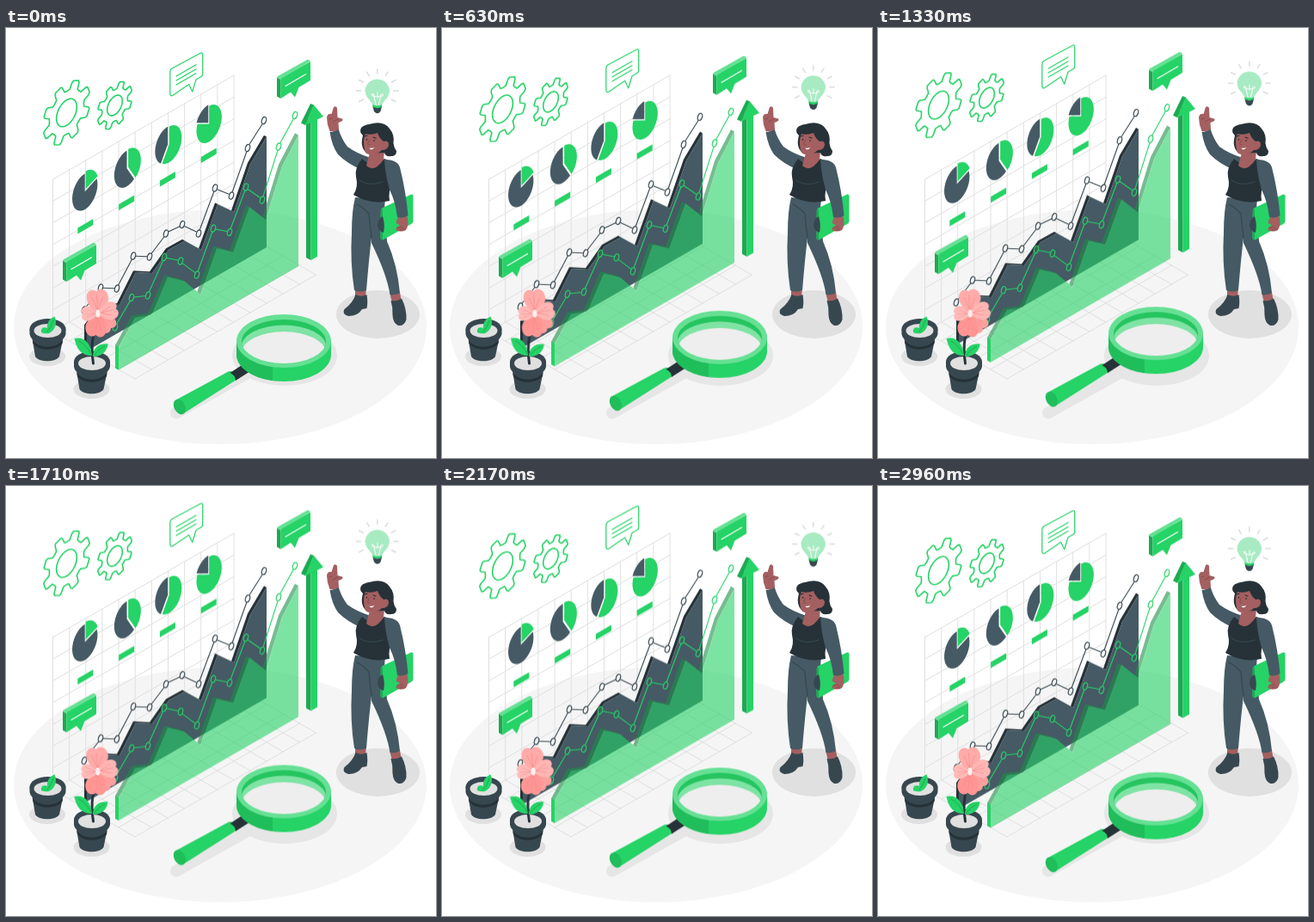
These frames come from a looping animation (500x500 px, 3000 ms). An HTML page:

```html
<!DOCTYPE html>
<html lang="en">
<head>
<meta charset="utf-8">
<title>Growth chart</title>
<style>
  html, body { margin: 0; width: 100%; height: 100%; overflow: hidden; background: #fff; }
  svg { display: block; width: 100vw; height: 100vh; }
  .float { animation: float 3s linear infinite; }
  .wind { animation: wind 3s linear infinite; transform-origin: 100px 390px; }
  @keyframes float { 50% { transform: translateY(-10px); } }
  @keyframes wind { 25% { transform: rotate(1deg); } 75% { transform: rotate(-1deg); } }
  .g { fill: #25d366; }
  .gm { fill: #20bd5b; }
  .gd { fill: #1ea952; }
  .gl { fill: #66e094; }
  .d1 { fill: #455a64; }
  .d2 { fill: #37474f; }
  .d3 { fill: #263238; }
  .skin { fill: #a45f60; }
  .shadow { fill: #e0e0e0; }
  .line { fill: none; stroke-linecap: round; stroke-linejoin: round; }
</style>
</head>
<body>
<svg viewBox="0 0 500 500">
  <defs>
    <g id="bubble">
      <path class="gd" d="M315 57.500l4.500 2.500V82l-4.500-2.500z"/>
      <path class="gl" d="M315 57.500q0-1 1-1.500l34-19q1-.5 2 0l2 1.500-34.500 21.500z"/>
      <path class="g" d="M319.500 60q0-1 1-1.500l32.500-19q1-.5 1 .8V60q0 1-1 1.500L340.500 69 336 80.500 331 74.500 319.500 82z"/>
      <path class="line" stroke="#fff" stroke-width="1.200" d="M325 67.500L348.500 53.700"/>
    </g>
    <g id="pot">
      <ellipse class="shadow" cx="48" cy="382" rx="21" ry="11"/>
      <path class="d2" d="M30 358L34 382C38 389 58 389 62 382L67 358z"/>
      <path class="d3" d="M30.800 363C38 373 58 373 66 363L65.500 367C58 376 38 376 31.500 367z"/>
      <path class="d2" d="M27.500 350V356C30 371 66 371 69.500 356V350z"/>
      <ellipse class="d2" cx="48.500" cy="350" rx="21" ry="12"/>
      <ellipse cx="48.500" cy="352" rx="16" ry="8" fill="#e0e0e0"/>
    </g>
    <path id="petal" d="M0 0C-6-4-13-13-10-21C-7-27-2-25 0-23C4-28 12-24 12-15C11-8 5-3 0 0z"/>
  </defs>

  <ellipse cx="249" cy="347.500" rx="240" ry="136.500" fill="#f5f5f5"/>
  <path id="grid" class="line" stroke="#e0e0e0"/>
  <ellipse class="shadow" cx="432.500" cy="333" rx="48.500" ry="28"/>
  <ellipse cx="324" cy="381" rx="61" ry="35" fill="#e6e6e6"/>
  <path class="line" stroke="#e6e6e6" stroke-width="14" d="M198 447.500L290 396"/>

  <g class="float">
    <path id="gears" class="line" stroke="#25d366" stroke-width="1.600"/>
    <path class="line" stroke="#25d366" stroke-width="1.200" d="M193 47L226 29.300Q228.700 28 228.700 31V54Q228.700 55.500 227 56.500L221 60 216.700 74 212.700 65.500 194 78.300Q190.800 80 190.800 76V51Q190.800 48.300 193 47zM198 56L221 42.700M198 61L221 47.700M198 66L221 52.700"/>
    <g id="pies"></g>
    <use href="#bubble"/>
    <use href="#bubble" x="-249" y="213"/>
    <g id="chart"></g>

    <path class="gd" d="M349 107V267L354.500 270V104z"/>
    <path class="g" d="M354.500 104V270L362 265.700V102z"/>
    <path class="gd" d="M343 110.500L354 88 358 89.500 348 113z"/>
    <path class="g" d="M348 113L357.500 89 369 103z"/>

    <path class="g" d="M198.500 432L258.500 399.500Q266 397 268 409L206 448.500z"/>
    <path class="d3" d="M260.500 401L281 387.500Q288 390 286.500 397.500L267 410Q267 404 260.500 401z"/>
    <ellipse class="gm" cx="201.800" cy="440.500" rx="6.300" ry="9.300" transform="rotate(-28 201.800 440.500)"/>
    <path class="g" d="M268 364V380A55 31 0 0 0 378 380V364z"/>
    <path class="gm" d="M268 364V380A55 31 0 0 0 310 410V394z"/>
    <ellipse class="gl" cx="323" cy="364" rx="55" ry="31"/>
    <clipPath id="lens"><ellipse cx="323" cy="364.500" rx="49" ry="25.500"/></clipPath>
    <g clip-path="url(#lens)">
      <rect x="270" y="335" width="106" height="60" fill="#25c560"/>
      <ellipse cx="323" cy="371" rx="49.500" ry="25.500" fill="#7fe3a4"/>
      <ellipse cx="323" cy="379" rx="49.500" ry="26" fill="#eee"/>
    </g>

    <path class="line" id="rays" stroke="#dcdcdc" stroke-width="1.500"/>
    <path fill="#a8ebc2" d="M426.500 91C426.500 85 417.500 82 417.500 72.500A14.300 14.300 0 0 1 446 72.500C446 82 437 85 437 91z"/>
    <path class="line" stroke="#fff" d="M430 89L428 79.500Q424.500 79 425.500 76.500Q428 76 428.500 79.500Q432 81 435 79.500Q436 76 438 77Q439 79.500 435.500 79.500L433.500 89M432 75V80"/>
    <path class="g" d="M426.500 89Q432 92 437 89V92Q432 95 426.500 92z"/>
    <path class="d2" d="M426.500 91.500Q432 95 437 91.500L435.500 97Q432 101.500 428 97z"/>
  </g>

  <use href="#pot"/>
  <path class="g" d="M41 354C40 347 46 348 48 349C47 342 52 337 56.500 335.500C60 343 57 352 50 355Q45 356 41 354z"/>
  <path class="line" stroke="#1ea952" d="M48 353Q53 348 55 340"/>
  <use href="#pot" x="51.500" y="38"/>
  <g class="wind">
    <path class="line" stroke="#263238" stroke-width="3" d="M101.500 390Q99 374 101 361Q102 352 106 342"/>
    <path class="g" d="M100 381C88 381 82 374 79.500 361C90 358 99 366 100 381z"/>
    <path class="g" d="M101 382C101 372 108 366 118.500 367.500C118 376 111 382 101 382z"/>
    <path class="line" stroke="#1ea952" d="M99 379Q94 369 85 364M103 380Q107 374 115 370"/>
    <g id="flower" transform="translate(107 332)"></g>
  </g>

  <g id="woman">
    <path class="skin" d="M406 302h13l-1 11h-12zM446 307h12l2 12-11 1z"/>
    <path class="d2" d="M406.500 310Q413 313.500 419.500 310Q421 319 419.500 326L414 327Q409 335 398 335Q390 332 393.500 327Q403 320 406.500 310z"/>
    <path class="d2" d="M447.500 317Q455 318 460 314.500Q466 326 465.500 339Q463 347 456 346Q450 343 449.500 334Q450 325 447.500 317z"/>
    <path class="d1" d="M421 200L440 202Q441 226 443 248Q455 275 458 308Q453 311 446.500 310Q443 287 425 250z"/>
    <path class="d1" d="M406 197L441 200Q438 226 426 235Q422 268 419 305Q412 308 405 305Q400 273 402 238Q402 213 406 197z"/>
    <path class="line" stroke="#37474f" stroke-width="1.300" d="M408 205Q417 210 422 216Q423 229 425 244"/>
    <path class="d1" d="M376.500 121Q382 121 386.500 117Q390 129 397 138Q408 146 424 151L414 165Q397 158 386 147Q379 137 376.500 121z"/>
    <path class="skin" d="M376.500 120Q373 112 373 104Q374 99 378.500 100L381 92Q383.500 90 385 93L385.500 104L391 105.500Q393 108 386.500 110L387 118Q382 121 376.500 120z"/>
    <path class="line" stroke="#804648" stroke-width=".7" d="M376 106L379 105M380 109L386 106"/>
    <path class="d3" d="M414 152Q425 163 440 152L450 156 450 180Q444 188 446 201Q424 206 404 194Q410 185 407 173Q405 163 414 152z"/>
    <path class="line" stroke="#455a64" stroke-width=".6" d="M411 177Q423 185 438 179"/>
    <path class="skin" d="M421 152L424 143 440 143 439 153Q428 169 419 160z"/>
    <path class="d3" d="M412.500 122Q410 114 422 112Q439 107 446 117Q452 124 450.500 134Q451 139 454 143Q454 149 448 149Q441 150 440 145L420 146Q411 139 415 125z"/>
    <path class="skin" d="M418 123Q415 130 416.500 139Q417 146 422 147Q430 149 437 142Q444 142 445 136Q445 130 439 132Q434 128 432 122Q425 125 418 123z"/>
    <path class="line" stroke="#263238" stroke-width="1.100" d="M417.500 126L420 125M427 127L430 128M419.500 129v1.200M428 130.300v1.200"/>
    <path class="line" stroke="#804648" stroke-width=".8" d="M422.500 130L420.500 135 423 136"/>
    <path d="M422.500 139.500Q425.500 140.500 428.500 138.500Q426.500 142 423.500 141z" fill="#fff"/>
    <path class="g" d="M436 212Q436 210 438 209L471 193.500Q473.500 193 473.500 195V225Q473 227 471 228L439 246Q435.500 247 435.500 244z"/>
    <path class="gd" d="M435.500 212L438 210.500V246.500Q435.500 247 435.500 244z"/>
    <path class="d2" d="M438 219Q432 222 432 230Q433 236 439 238Q441 229 438 219z"/>
    <path class="d1" d="M440 153Q455 153 458 162Q465 190 467.500 218Q461 223 455 220Q453 202 446 188Q441 171 440 153z"/>
    <path class="skin" d="M455.500 220Q461 222 466.500 218.500Q469 229 465 235Q459 238 453.500 235Q453 231 458 230L456 228Q453 228 454 225z"/>
    <path class="line" stroke="#804648" stroke-width=".7" d="M455 232L461 231M458 235L463 233"/>
  </g>
</svg>
<script>
  const $ = id => document.getElementById(id);
  const rad = a => a * Math.PI / 180;
  const poly = pts => 'M' + pts.map(p => p.map(v => v.toFixed(2)).join(' ')).join('L') + 'z';
  const shape = (d, fill) => `<path d="${d}" fill="${fill}"/>`;
  const GREEN = '#25d366';

  // Point on a wall-aligned circle, angle clockwise from the top
  const onWall = (cx, cy, w, h, a, r = 1) => {
    const x = Math.sin(rad(a)) * r, y = -Math.cos(rad(a)) * r;
    return [cx + w * x, cy - w * 0.577 * x + h * y];
  };

  function drawGrid() {
    const w = 210.5, rise = 121, wall = 177, dx = 95.5, dy = 55;
    let d = '';
    for (let i = 0; i <= 11; i++) {
      const x = 54.5 + w * i / 11, y = 176 - rise * i / 11;
      d += `M${x} ${y}v${wall}l${dx} ${dy}`;
    }
    for (let i = 0; i <= 7; i++) d += `M54.5 ${176 + wall * i / 7}l${w} ${-rise}`;
    for (let i = 1; i <= 5; i++) d += `M${54.5 + dx * i / 5} ${353 + dy * i / 5}l${w} ${-rise}`;
    $('grid').setAttribute('d', d);
  }

  function gear(cx, cy, w, h) {
    const rim = [], hole = [];
    for (let k = 0; k < 8; k++) {
      const a = 24 + k * 45;
      for (const [da, r] of [[-14, .76], [-10, .96], [-7, 1.02], [7, 1.02], [10, .96], [14, .76], [22.5, .74]])
        rim.push(onWall(cx, cy, w, h, a + da, r));
    }
    for (let a = 0; a < 360; a += 10) hole.push(onWall(cx, cy, w, h, a, .44));
    return poly(rim) + poly(hole);
  }

  function wedge(cx, cy, from, to, fill) {
    const pts = [[cx, cy]];
    for (let i = 0; i <= 30; i++) pts.push(onWall(cx, cy, 14.7, 20.8, from + (to - from) * i / 30));
    return shape(poly(pts), fill);
  }

  function drawPies() {
    const pies = [[92, 189.5, 70], [141, 163, 145], [188.5, 135.5, 213], [235.5, 110.5, 292]];
    $('pies').innerHTML = pies.map(([x, y, cut], i) => {
      const mid = rad(cut / 2), ox = Math.sin(mid) * 1.2, oy = -Math.cos(mid) * 2 - .6;
      return wedge(x - ox * .4, y - oy * .3, cut, 360, '#455a64') +
        wedge(x + ox, y + oy, 0, cut, GREEN) +
        shape(`M${83.3 + i * 47.8} ${232.5 - i * 27.5}l18-10.400v7l-18 10.400z`, GREEN);
    }).join('');
  }

  // Extruded area under a line: edge strips, then the front face
  function area(line, drop, depth, base, side, front) {
    const back = line.map(([x, y]) => [x, y + drop]);
    const face = back.map(([x, y]) => [x + depth, y + depth * .58]);
    const last = face[face.length - 1], first = face[0];
    const footY = base + (last[0] - first[0]) * .577;
    const strips = back.slice(1).map((p, i) => poly([back[i], p, face[i + 1], face[i]])).join('');
    const left = poly([back[0], first, [first[0], footY], [back[0][0], footY - depth * .58]]);
    return { left, svg: shape(strips + left, side) + shape(poly([...face, [last[0], base], [first[0], footY]]), front) };
  }

  // Segments stop at the rims of the hollow markers
  function markers(line, color) {
    let d = '', dots = '';
    line.forEach(([x, y], i) => {
      if (i) {
        const [px, py] = line[i - 1], a = Math.atan2(y - py, x - px);
        const ox = Math.cos(a) * 3, oy = Math.sin(a) * 4;
        d += `M${px + ox} ${py + oy}L${x - ox} ${y - oy}`;
      }
      dots += `<ellipse cx="${x}" cy="${y}" rx="2.500" ry="4.200" transform="rotate(18 ${x} ${y})"/>`;
    });
    return `<g fill="none" stroke="${color}" stroke-width="1.100"><path d="${d}"/>${dots}</g>`;
  }

  function drawChart() {
    const points = (x0, ys) => ys.map((y, i) => [x0 + i * 19, y]);
    const dark = points(91, [328, 302, 303, 265, 266, 239, 228.5, 239, 186, 195, 139.5, 107.5]);
    const green = points(127, [348, 313.5, 311, 266.5, 271, 287, 233, 237.5, 185, 200, 138, 101.5]);
    const backArea = area(dark, 17.300, 3, 255, '#263238', '#455a64');
    const frontArea = area(green, 20.800, 4, 277, '#1b8f47', GREEN);
    $('chart').innerHTML = markers(dark, '#37474f') + backArea.svg +
      `<g opacity=".6">${frontArea.svg}</g>` + shape(frontArea.left, GREEN) + markers(green, GREEN);
  }

  function drawFlower() {
    const petals = [[139, '#ff9f9d', .98], [186, '#ff9694', 1.08], [268, '#ffbab8', .76], [356, '#ffaba9', 1.12], [76, '#ffb5b3', .93]];
    $('flower').innerHTML = petals.map(([a, fill, s]) =>
      `<g transform="rotate(${a}) scale(${s})"><use href="#petal" fill="${fill}"/>` +
      '<path class="line" stroke="#f08c8a" stroke-width=".6" d="M0-3L-5-17M0-3L0-19M0-3L6-16"/></g>').join('') +
      '<ellipse rx="2.600" ry="4.500" fill="#fff0ee"/>';
  }

  function drawRays() {
    let d = '';
    for (let a = -120; a <= 120; a += 30) {
      const s = Math.sin(rad(a)), c = -Math.cos(rad(a));
      d += `M${431.8 + 19 * s} ${73 + 20 * c}L${431.8 + 24.5 * s} ${73 + 25 * c}`;
    }
    $('rays').setAttribute('d', d);
  }

  drawGrid();
  $('gears').setAttribute('d', gear(70.5, 98.5, 27, 33.5) + gear(126.5, 90, 20, 24.5));
  drawPies();
  drawChart();
  drawFlower();
  drawRays();
</script>
</body>
</html>
```
